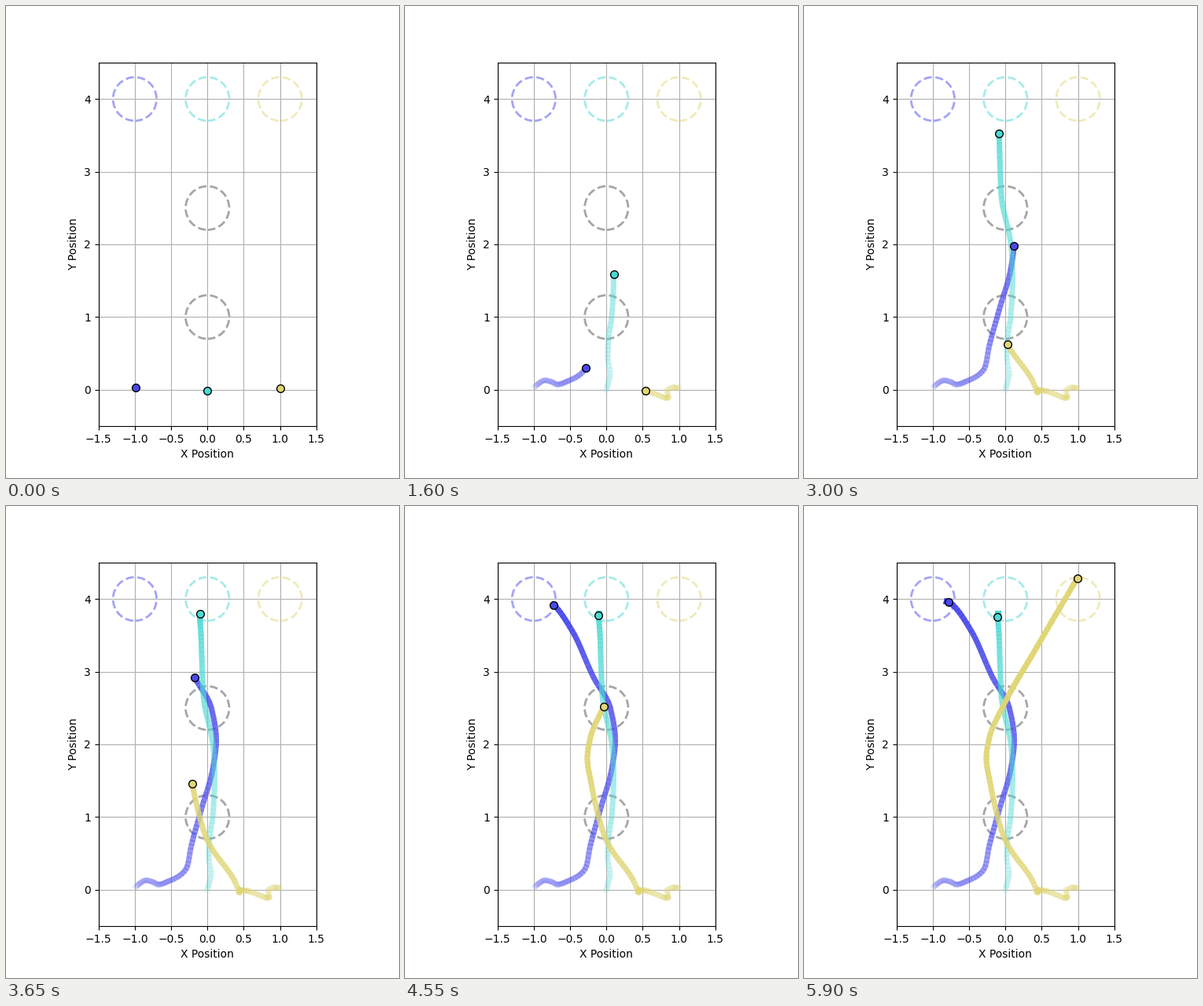
Animation, 500 px wide and 600 px high, one loop 5.95 s. Source, as a matplotlib script:

```python
import numpy as np
import matplotlib.pyplot as plt
from matplotlib.animation import FuncAnimation
from matplotlib.collections import LineCollection
from matplotlib.patches import Circle

FRAMES, STEP = 119, 50
SCALE, X0, Y0 = 92.4, 256.25, 487.8  # pixels per unit and axes origin

BLUE = (0.29, 0.29, 0.92)
CYAN = (0.30, 0.85, 0.83)
YELLOW = (0.88, 0.84, 0.46)

# Waypoints per robot: (time in ms, stage x, stage y)
ROUTES = [
    (BLUE, -1, [
        (0, 165, 484.5), (300, 170, 480), (600, 178.5, 476),
        (800, 187, 478), (950, 194, 481), (1250, 209, 476),
        (1450, 222, 469), (1600, 230, 459.5), (1850, 235.5, 433),
        (2350, 249, 384), (2800, 263.5, 332), (3050, 267.5, 298),
        (3350, 261, 256), (3650, 240, 218), (4100, 214, 161),
        (4550, 188.5, 125.5), (4700, 181.5, 121.5), (5900, 184, 122)]),
    (CYAN, 0, [
        (0, 256, 489), (300, 258.5, 479), (500, 261, 467),
        (700, 258, 447), (950, 259, 422), (1200, 263, 394.5),
        (1600, 265.5, 341), (1800, 264, 310), (2350, 251, 240),
        (3000, 248, 162), (3300, 246.5, 140), (3450, 246.5, 135.5),
        (3650, 246.5, 137), (5900, 245.5, 140.5)]),
    (YELLOW, 1, [
        (0, 349, 486), (600, 341, 485), (800, 333.5, 489),
        (950, 335, 497), (1150, 332, 498), (1600, 306, 489),
        (1850, 297.5, 488), (2150, 297, 491), (2350, 291, 477),
        (3100, 254.5, 421), (3650, 237, 353), (4000, 232, 320),
        (4250, 236, 294), (4550, 253, 255), (5400, 297, 178),
        (5900, 347.5, 92)]),
]


def monotone(t, keys, vals):
    """Cubic Hermite interpolation without overshoot."""
    h = np.diff(keys)
    d = np.diff(vals) / h
    m = np.zeros(len(keys))
    m[0], m[-1] = d[0], d[-1]
    for i in range(1, len(d)):
        if d[i - 1] * d[i] > 0:
            a, b = 2 * h[i] + h[i - 1], h[i] + 2 * h[i - 1]
            m[i] = (a + b) / (a / d[i - 1] + b / d[i])
    j = np.clip(np.searchsorted(keys, t, side="right") - 1, 0, len(d) - 1)
    u = (t - keys[j]) / h[j]
    return ((1 + 2 * u) * (1 - u) ** 2 * vals[j]
            + u * (1 - u) ** 2 * h[j] * m[j]
            + u * u * (3 - 2 * u) * vals[j + 1]
            + u * u * (u - 1) * h[j] * m[j + 1])


def sample(route):
    t, x, y = np.array(route, float).T
    now = np.arange(FRAMES) * STEP
    return np.column_stack([(monotone(now, t, x) - X0) / SCALE,
                            (Y0 - monotone(now, t, y)) / SCALE])


fig, ax = plt.subplots(figsize=(5, 6), dpi=100)
ax.set_xlim(-1.5, 1.5)
ax.set_ylim(-0.5, 4.5)
ax.set_aspect("equal")
ax.set_xticks(np.arange(-1.5, 1.6, 0.5))
ax.set_yticks(range(5))
ax.set_xlabel("X Position")
ax.set_ylabel("Y Position")
ax.grid(True)


def ring(x, y, color, alpha):
    ax.add_patch(Circle((x, y), 0.3, fill=False, ls="--", lw=2,
                        ec=color, alpha=alpha))


for gate in (1, 2.5):
    ring(0, gate, "gray", 0.7)

robots = []
fade = 0.05 + 0.95 * np.arange(1, FRAMES) / FRAMES
for color, goal, route in ROUTES:
    ring(goal, 4, color, 0.5)
    path = sample(route)
    segs = np.stack([path[:-1], path[1:]], axis=1)
    shades = [(*color, a) for a in fade]
    trail = LineCollection([], linewidths=5, capstyle="projecting", zorder=2)
    ax.add_collection(trail, autolim=False)
    dot, = ax.plot([], [], "o", ms=7, mfc=color, mec="black", mew=1, zorder=3)
    robots.append((path, segs, shades, trail, dot))


def update(k):
    for path, segs, shades, trail, dot in robots:
        trail.set_segments(segs[:k])
        trail.set_color(shades[:k])
        dot.set_data(path[k:k + 1, 0], path[k:k + 1, 1])
    return [artist for robot in robots for artist in robot[3:]]


anim = FuncAnimation(fig, update, frames=FRAMES, interval=STEP,
                     repeat=True, repeat_delay=0, blit=False)
plt.show()
```
